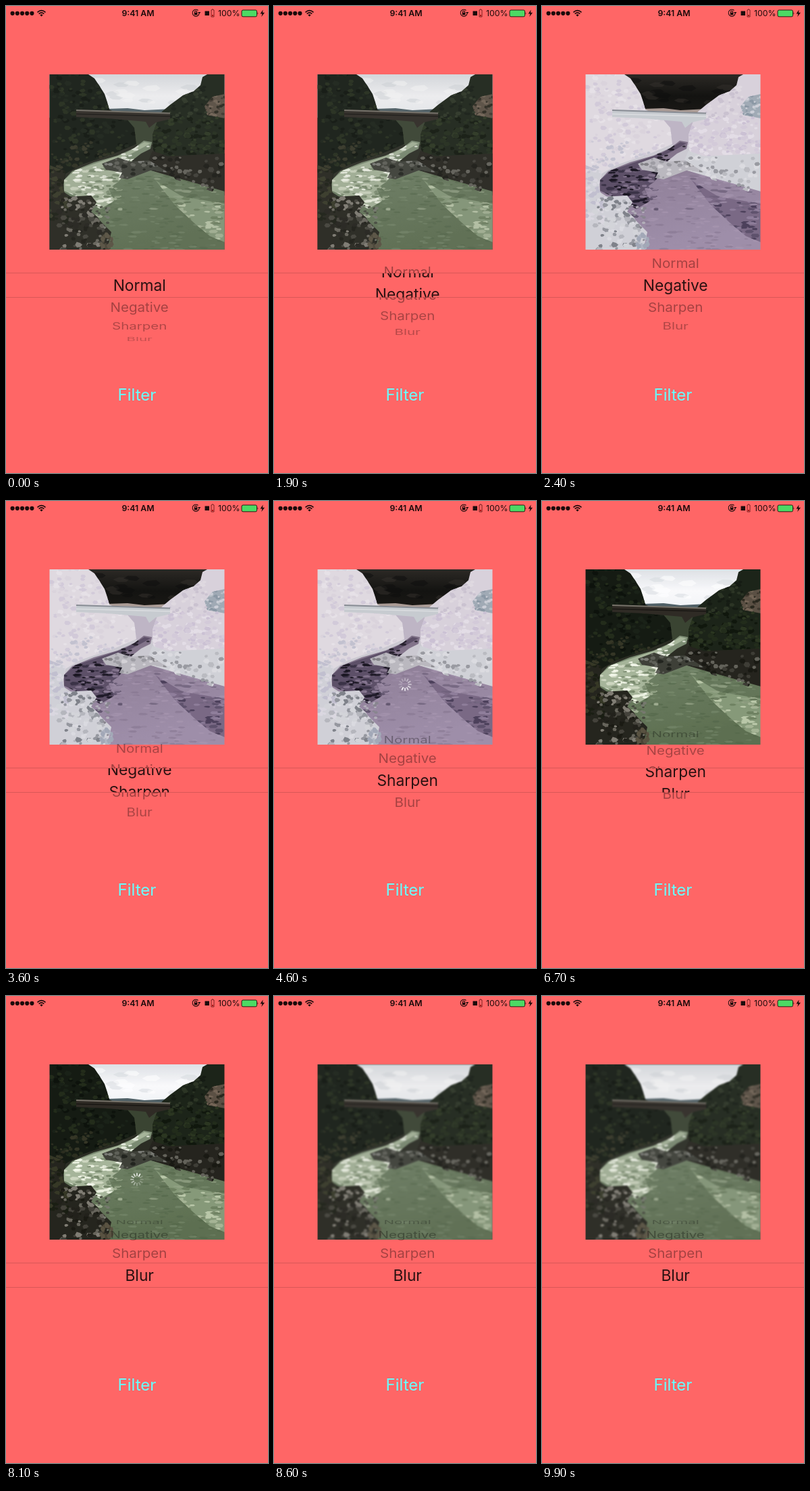
Animation of 388 by 690 pixels, one loop 10000 ms. Source, as an HTML page:

```html
<!DOCTYPE html>
<html lang="en">
<head>
<meta charset="utf-8">
<title>Photo filter picker</title>
<style>
html, body { margin: 0; width: 100%; height: 100%; overflow: hidden; background: #ff6666; }
svg { display: block; width: 388px; height: 690px; }
text { font-family: Inter, Roboto, sans-serif; }
.row { text-anchor: middle; }
</style>
</head>
<body>
<svg id="stage" viewBox="0 0 388 690" xmlns="http://www.w3.org/2000/svg">
  <defs>
    <clipPath id="frame"><rect x="64.5" y="101" width="259" height="259"/></clipPath>
    <clipPath id="lens"><rect x="0" y="395" width="388" height="35.5"/></clipPath>
    <clipPath id="rim"><path d="M0 300H388V395H0ZM0 430.5H388V520H0Z"/></clipPath>
    <linearGradient id="sky" x2="0" y2="1"><stop stop-color="#d3d6da"/><stop offset=".5" stop-color="#ececee"/><stop offset="1" stop-color="#e2e5e8"/></linearGradient>
    <linearGradient id="water" x2=".3" y2="1"><stop stop-color="#8b9884"/><stop offset=".45" stop-color="#6d7d64"/><stop offset="1" stop-color="#617156"/></linearGradient>
  </defs>
  <rect width="388" height="690" fill="#ff6666"/>

  <g id="status" fill="#1c0b0b">
    <g id="dots"></g>
    <path d="M46.5 9.3Q52.5 3.8 58.5 9.3M48.7 11.7Q52.5 8.2 56.3 11.7" fill="none" stroke="#1c0b0b" stroke-width="1.7"/>
    <path d="M50.3 13.2Q52.5 11.3 54.7 13.2L52.5 15.5Z"/>
    <text x="195.5" y="15" font-size="12.3" font-weight="600" text-anchor="middle">9:41 AM</text>
    <path d="M284.5 6.5A5 5 0 1 0 286 11.5M279.6 10V8.8a1.5 1.5 0 0 1 3 0V10" fill="none" stroke="#1c0b0b" stroke-width="1.1"/>
    <path d="M278.8 9.8h4.6v3.4h-4.6ZM284 9h4.4l-2.2 2.8Z"/>
    <rect x="294.5" y="7.5" width="6.5" height="6.5"/>
    <path d="M304 6h1V5h2v1h1v10h-4Z" fill="none" stroke="#7c2222"/>
    <rect x="305" y="13" width="2" height="2" fill="#b01515"/>
    <text x="314" y="15" font-size="12.3">100%</text>
    <rect x="349" y="6" width="22.5" height="9.8" rx="2" fill="#4cd964" stroke="#1c0b0b" stroke-width=".9"/>
    <path d="M372.6 9q1.7 1.9 0 3.8ZM380.5 5.5L376.5 11.5H379.3L378.3 16L383 9.7H380Z"/>
  </g>

  <g clip-path="url(#frame)"><g id="photo"></g></g>
  <g id="spinner" stroke="#fff" stroke-width="1.7" stroke-linecap="round" transform="translate(194 271)"></g>

  <g id="rimRows" clip-path="url(#rim)" font-size="20.5"></g>
  <g id="lensRows" clip-path="url(#lens)" font-size="22.8" fill="#2a1111"></g>
  <path d="M0 394.5H388M0 430.5H388" stroke="#000" stroke-opacity=".15"/>
  <text id="button" class="row" x="194" y="582.5" font-size="24" fill="#66ffff">Filter</text>
</svg>

<script>
const $ = id => document.getElementById(id);
const photo = $('photo');

function add(parent, tag, attrs, label) {
  const el = document.createElementNS('http://www.w3.org/2000/svg', tag);
  for (const key in attrs) el.setAttribute(key, attrs[key]);
  if (label) el.textContent = label;
  parent.append(el);
  return el;
}

let seed = 11;
function rand() {
  seed = (seed * 16807) % 2147483647;
  return seed / 2147483647;
}
const pick = (a, b) => a + (b - a) * rand();

// A flat area; later dabs can be clipped to it by id.
function area(id, d, fill) {
  add(photo, 'path', { d, fill });
  add(add($('stage').querySelector('defs'), 'clipPath', { id }), 'path', { d });
}

// Irregular six-sided dabs spread over a box, one path per colour.
function dabs(clip, [x0, y0, x1, y1], colors, n, size, flat = 0.7, opacity = 1) {
  for (const fill of colors) {
    let d = '';
    for (let i = 0; i < n; i++) {
      const x = pick(x0, x1), y = pick(y0, y1), r = pick(size * 0.4, size);
      for (let k = 0; k < 6; k++) {
        const a = k * Math.PI / 3, q = r * pick(0.7, 1.1);
        d += (k ? 'L' : 'M') + (x + q * Math.cos(a)).toFixed(1) + ' ' + (y + q * flat * Math.sin(a)).toFixed(1);
      }
      d += 'Z';
    }
    add(photo, 'path', { d, fill, opacity, 'clip-path': `url(#${clip})` });
  }
}

function paintPhoto() {
  area('ground', 'M40 80H350V380H40Z', '#34362e');
  area('air', 'M64 101H324V165H64Z', 'url(#sky)');
  dabs('air', [130, 108, 280, 145], ['#cccfd4', '#f3f3f4'], 8, 16, 0.35, 0.5);
  area('far', 'M150 152L180 151L205 154L245 152V205H150Z', '#55646a');
  area('valley', 'M150 165H245V205H150Z', '#414a3a');

  area('left', 'M64 101H122L131 107L139 119L146 130L150 142L153 153L178 166L190 180L193 204L160 218L110 235L88 248L84 272L100 300L64 310Z', '#20261f');
  dabs('left', [64, 101, 192, 235], ['#191e18', '#2d3526', '#252c23'], 70, 6);
  dabs('left', [64, 200, 160, 245], ['#35372a', '#3d3e30'], 22, 5);
  area('right', 'M324 101H298L291 105L288 117L278 126L262 132L243 146L231 156L224 170L217 190L217 210L232 240L324 276Z', '#272e24');
  area('slope', 'M324 130L306 134L294 148L298 161L324 166Z', '#5f554a');
  dabs('slope', [294, 130, 324, 165], ['#463f37', '#74675a', '#333128'], 14, 4);
  dabs('right', [217, 164, 324, 232], ['#1c2219', '#343e2b', '#2c3526'], 55, 6);
  dabs('right', [240, 115, 300, 165], ['#20261f', '#353d2f'], 26, 5);
  area('bank', 'M217 214L240 222L324 218V280L232 250L205 242Z', '#2f2e28');

  area('bridge', 'M104 153L243 158V167L222 172L212 180L207 171L150 166L104 164Z', '#38342f');
  add(photo, 'path', { d: 'M104 154L243 158.5', stroke: '#77736b', 'stroke-width': 2 });
  add(photo, 'path', { d: 'M104 159.5L243 163', stroke: '#24221f', 'stroke-width': 1.5 });

  area('river', 'M204 199L216 201L214 211L200 218L186 229L205 240L235 249L324 274V361H148L150 338L136 312L112 292L86 275L85 258L98 244L130 231L165 221L190 210Z', 'url(#water)');
  dabs('river', [140, 250, 324, 360], ['#55664d', '#7f8d75', '#64755b'], 70, 9, 0.25, 0.5);
  area('foam', 'M205 201L214 203L194 214L172 225L150 234L176 248L166 260L152 270L160 288L140 300L110 284L86 273L86 257L102 243L134 232L176 218Z', '#a2af97');
  dabs('foam', [86, 236, 176, 300], ['#dfe4d5', '#7e8d74', '#c4ccb8', '#e4e8dc'], 32, 8, 0.35);
  dabs('river', [130, 250, 172, 312], ['#a9b59c', '#6c7c62'], 16, 7, 0.35, 0.8);
  dabs('river', [170, 204, 214, 228], ['#d9ded2'], 18, 6, 0.4);
  area('rapid', 'M222 258L262 282L324 292V349L302 340L278 320L250 294Z', '#85967a');
  dabs('rapid', [225, 260, 324, 350], ['#c0cab0', '#6c7c60', '#a9b59a'], 34, 9, 0.35, 0.8);
  dabs('river', [215, 255, 324, 300], ['#95a288', '#5c6c52'], 24, 9, 0.25, 0.7);

  dabs('bank', [217, 224, 324, 272], ['#24241f', '#66655e', '#45443e'], 18, 6, 0.8);
  area('shoal', 'M142 233L166 224L184 230L212 228L240 246L214 243L180 256L168 254L172 246L148 242Z', '#454740');
  dabs('shoal', [142, 224, 236, 255], ['#7b7c77', '#62635c', '#2c2e29'], 18, 5);
  area('shore', 'M64 235L88 244L84 270L90 282L126 280L134 290L126 304L144 322L156 334L150 361H64Z', '#2f2f28');
  dabs('shore', [64, 235, 94, 320], ['#25281f', '#3e4030'], 26, 6);
  dabs('shore', [78, 284, 146, 360], ['#6a6860', '#25251f', '#4a4942', '#807d75', '#2c2b26'], 20, 6, 0.8);
  dabs('river', [128, 290, 154, 350], ['#4d5146', '#777a70'], 10, 4, 0.7);
  dabs('ground', [140, 338, 157, 360], ['#4e493c', '#5d5748'], 12, 4, 1.3);
}

const names = ['Normal', 'Negative', 'Sharpen', 'Blur'];
const makeRows = id => names.map(name => add($(id), 'text', { class: 'row', dy: '.36em' }, name));
const rimRows = makeRows('rimRows');
const lensRows = makeRows('lensRows');

// Rows sit on a cylinder seen from the front.
function turnWheel(pos) {
  names.forEach((_, i) => {
    const angle = (i - pos) * 0.387;
    const place = `translate(197.7 ${413 + 86 * Math.sin(angle)}) scale(1 ${Math.cos(angle)})`;
    rimRows[i].setAttribute('transform', place);
    lensRows[i].setAttribute('transform', place);
    rimRows[i].setAttribute('fill-opacity', 0.37 * Math.sqrt(Math.cos(angle)));
  });
}

const ease = (t, a, b) => {
  const u = Math.min(1, Math.max(0, (t - a) / (b - a)));
  return u * u * (3 - 2 * u);
};
const within = (t, a, b) => t >= a && t < b;

paintPhoto();
for (let i = 0; i < 5; i++) add($('dots'), 'circle', { cx: 9.6 + 7.2 * i, cy: 10.8, r: 3.1 });
const spokes = Array.from({ length: 12 }, (_, i) =>
  add($('spinner'), 'path', { d: 'M0 -5.5V-9', transform: `rotate(${i * 30})` }));

let look;
function draw(now) {
  const t = Math.floor(now % 10000 / 100) * 100;
  turnWheel(ease(t, 1600, 2130) + ease(t, 3150, 4050) + ease(t, 6250, 7300));

  const next = t < 2300 ? 'none' : t < 4800 ? 'invert(1)' : t < 8500 ? 'contrast(1.12)' : 'blur(1px)';
  if (next !== look) photo.style.filter = look = next;

  const busy = within(t, 4400, 4800) || within(t, 8000, 8500);
  $('spinner').setAttribute('visibility', busy ? 'visible' : 'hidden');
  const head = Math.floor(t * 12 / 1000);
  spokes.forEach((spoke, i) => {
    const age = ((head - i) % 12 + 12) % 12;
    spoke.setAttribute('stroke-opacity', Math.max(0.25, 0.9 - age * 0.08));
  });

  const pressed = within(t, 4300, 4500) || within(t, 7900, 8100);
  $('button').setAttribute('opacity', pressed ? 0.3 : 1);
  requestAnimationFrame(() => draw(performance.now() - start));
}
const start = performance.now();
draw(0);
</script>
</body>
</html>
```
